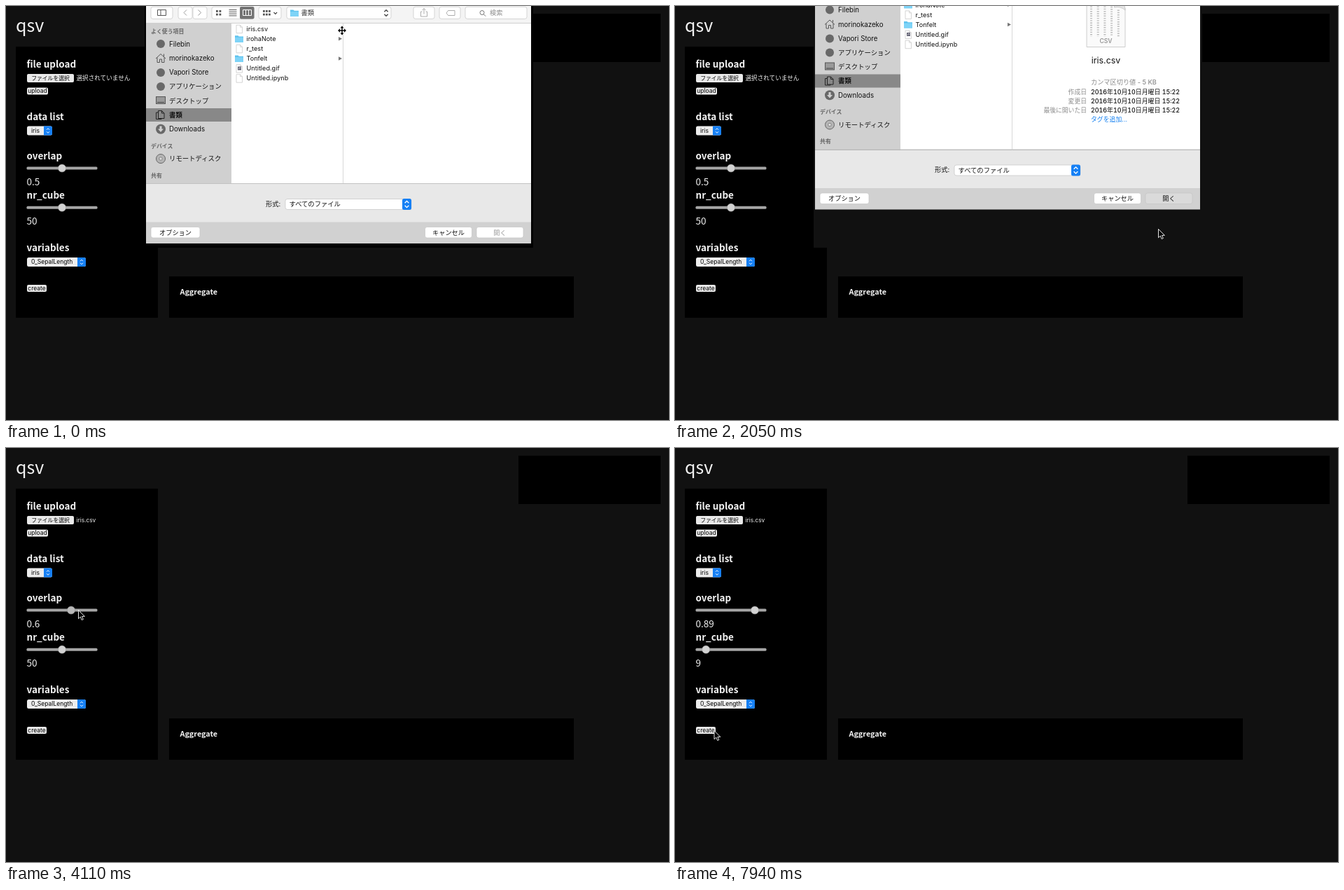
These frames come from a looping animation (947x591 px, 8000 ms). An HTML page:

```html
<!DOCTYPE html>
<html lang="ja">
<head>
<meta charset="utf-8">
<title>qsv</title>
<style>
html, body { margin: 0; width: 100%; height: 100%; overflow: hidden; background: #111; }
svg { display: block; width: 947px; height: 591px; }
text { font-family: Inter, 'Noto Sans CJK JP', 'Noto Sans CJK', sans-serif; white-space: pre; }
.page { font-family: 'Noto Sans CJK JP', 'Noto Sans CJK', sans-serif; }
.date { font-variant-numeric: tabular-nums; }
</style>
</head>
<body>
<svg id="stage" viewBox="0 0 947 591"></svg>
<script>
const LOOP = 8000, TICK = 146.9;

// Markup helpers; text is placed by its vertical centre.
const rect = (x, y, w, h, fill, extra = '') =>
  `<rect x="${x}" y="${y}" width="${w}" height="${h}" fill="${fill}" ${extra}/>`;
const text = (x, y, size, s, fill = '#111', extra = '') =>
  `<text x="${x}" y="${y + size * 0.35}" font-size="${size}" fill="${fill}" ${extra}>${s}</text>`;
const line = (d, stroke = '#555', width = 1) =>
  `<path d="${d}" fill="none" stroke="${stroke}" stroke-width="${width}"/>`;
const shape = (d, fill, extra = '') => `<path d="${d}" fill="${fill}" ${extra}/>`;
const group = (id, body) => `<g id="${id}">${body}</g>`;
const repeat = (n, draw) => Array.from({ length: n }, (_, i) => draw(i)).join('');
const bold = 'font-weight="700"';
const middle = 'text-anchor="middle"';

const heading = (y, s) => text(29.5, y, 13.5, s, '#f4f4f4', bold + ' class="page"');
const pageText = (x, y, size, s, extra = '') => text(x, y, size, s, '#f2f2f2', 'class="page" ' + extra);
const chevrons = (x, y, color, k = 1) =>
  line(`M${x - 2 * k} ${y - 1.3 * k}l${2 * k} ${-2 * k} ${2 * k} ${2 * k}M${x - 2 * k} ${y + 1.3 * k}l${2 * k} ${2 * k} ${2 * k} ${-2 * k}`, color, k);
const button = (x, y, w, h, label, size) =>
  rect(x, y, w, h, '#e9e9e9', 'rx="2"') + text(x + w / 2, y + h / 2, size, label, '#000', middle);
const select = (x, y, w, label) =>
  rect(x, y, w, 13, '#ededed', 'rx="2.5"') +
  shape(`M${x + w - 12} ${y}h9.5q2.5 0 2.5 2.5v8q0 2.5 -2.5 2.5h-9.5z`, '#1680f5') +
  chevrons(x + w - 6, y + 6.5, '#fff') + text(x + 6, y + 6.5, 8.5, label, '#000');
const slider = (name, y) => rect(29.5, y - 2, 101, 4, '#a6a6a6', 'rx="1.5"') +
  `<circle id="${name}Knob" cy="${y}" r="5.6" stroke="#8d8d8d" stroke-width=".5"/>` +
  pageText(29.5, y + 20, 13.6, '', `id="${name}Text"`);

function page() {
  return rect(0, 0, 947, 591, '#111') + rect(14, 58, 203, 387, '#000') +
    rect(732, 11, 203, 69, '#000') + rect(233, 386, 578, 59, '#000') +
    pageText(14, 28, 25, 'qsv') +
    heading(83, 'file upload') + button(30, 97, 67, 12, 'ファイルを選択', 7.8) +
    pageText(100.5, 103, 8.6, '選択されていません', 'id="noFile"') +
    text(100.5, 103, 8.3, 'iris.csv', '#f2f2f2', 'id="fileName"') +
    button(30, 116.5, 30, 10, 'upload', 8.5) +
    heading(158, 'data list') + select(30, 171.5, 36, 'iris') +
    heading(214, 'overlap') + slider('overlap', 231.5) +
    heading(270.5, 'nr_cube') + slider('cube', 287.7) +
    heading(345, 'variables') + select(30, 359, 84, '0_SepalLength') +
    button(30, 398, 28, 10, 'create', 8.5) +
    pageText(248.5, 408.5, 10.8, 'Aggregate', bold);
}

const control = (x, y, w, h, extra = '') =>
  rect(x, y, w, h, '#fff', `rx="3" stroke="#c4c4c4" stroke-width=".7" ${extra}`);
const folder = (x, y) =>
  shape(`M${x} ${y - 4.5}h4.5l1.2 1.3h6.3v8.2h-12z`, '#5fc3ee') + rect(x, y - 2, 12, 7, '#7ed3f7', 'rx=".7"');
const file = (x, y) =>
  shape(`M${x} ${y - 5.5}h5.5l3 3v8.5h-8.5z`, '#fff', 'stroke="#c3c3c3" stroke-width=".7"') +
  line(`M${x + 5.5} ${y - 5.5}v3h3`, '#c3c3c3', 0.7);
const dot = (y, r = 6) => `<circle cx="221" cy="${y}" r="${r}" fill="#686868"/>`;

function toolbar() {
  const box = (x, w) => control(x, 1.2, w, 17.2);
  const grid = (x, columns, rows, gap) => repeat(columns * rows, i =>
    rect(x + i % columns * gap, 6 + Math.floor(i / columns) * 4.7, 2.8, 2.8, '#555'));
  return rect(200, 0, 550, 25, '#f4f4f4') + line('M200 24.5h550', '#d0d0d0') +
    box(207, 31) + line('M216.5 5.5h12v8h-12zM221 5.5v8') +
    box(246, 20) + box(267, 20) + line('M258 5.5l-4 4 4 4M274.5 5.5l4 4 -4 4', '#9a9a9a') +
    box(294, 60) + grid(300, 2, 2, 4.5) +
    repeat(4, i => line(`M318.5 ${5.5 + i * 2.8}h11`)) +
    rect(334, 1, 20.5, 17.5, '#737373', 'rx="2"') + line('M338.5 5.5h12v8h-12zM342.5 5.5v8M346.5 5.5v8', '#fff') +
    box(361, 32) + grid(367, 3, 2, 4) + line('M382.5 9l2.3 2.3 2.3 -2.3', '#444', 1.2) +
    box(401, 149) + folder(406, 10) + text(421.5, 10, 9.3, '書類', '#333') + chevrons(543, 10, '#444', 1.3) +
    box(582, 30) + box(619, 30) +
    group('tools', line('M594.5 8h-2v7h9v-7h-2M597 11.5v-8M594.5 6l2.5 -2.5 2.5 2.5', '#333') +
      line('M629 10l2.5 -3.5h9.5v7h-9.5z', '#333')) +
    box(656, 88) + '<circle cx="680" cy="9.5" r="3" fill="none" stroke="#777"/>' +
    line('M682.2 11.7l3 3', '#777') + text(691, 10, 9.2, '検索', '#8c8c8c');
}

function sidebar() {
  const caption = (y, s) => text(207, y, 7.9, s, '#666', bold);
  const item = (row, s, size = 9.7, extra = '') => text(233, 54.4 + row * 20.25, size, s, '#111', extra);
  return rect(200, 25, 122, 229, '#d0d0d0') + rect(200, 146, 122, 19, '#888') +
    caption(36, 'よく使う項目') + caption(200, 'デバイス') + caption(242, '共有') +
    dot(54) + item(0, 'Filebin') +
    line('M214 75l7 -6.5 7 6.5M216 73.5v7h3.5v-4.5h3v4.5h3.5v-7M225.5 68.5v3.5') + item(1, 'morinokazeko') +
    dot(95) + item(2, 'Vapori Store') +
    dot(115) + item(3, 'アプリケーション', 9.4) +
    rect(214.5, 129.5, 13, 10, '#999', 'stroke="#555"') + line('M216 137.5h10', '#444') + item(4, 'デスクトップ', 9.4) +
    line('M217.5 149.5h5l3.5 3.5v7.5h-8.5zM222.5 149.5v3.5h3.5M217 152h-2.5v9.5h7.5v-1', '#222') + item(5, '書類', 9.4, bold) +
    dot(175.7, 7) + shape('M219.5 171.5h3v4h2.5l-4 4.5 -4 -4.5h2.5z', '#d0d0d0') + item(6, 'Downloads') +
    '<circle cx="221" cy="218" r="6.5" fill="#b5b5b5" stroke="#666"/><circle cx="221" cy="218" r="2.2" fill="#ddd" stroke="#777" stroke-width=".8"/>' +
    text(233, 218, 9.4, 'リモートディスク');
}

function fileList() {
  const names = ['iris.csv', 'irohaNote/', 'r_test', 'Tonfelt/', 'Untitled.gif', 'Untitled.ipynb'];
  const row = i => {
    const y = 32.7 + i * 14.1, name = names[i].replace('/', '');
    const icon = name === names[i] ? file(329, y)
      : folder(327, y) + shape(`M475 ${y - 2.7}l5 2.7 -5 2.7z`, '#777');
    return icon + text(343.5, y, 9.15, name, '#111', i ? '' : 'id="firstFile"');
  };
  return rect(322, 25, 428, 229, '#fff') + line('M481.5 25v229', '#d8d8d8') +
    rect(322, 26, 159, 13, '#0b64d8', 'id="highlight"') + repeat(names.length, row) +
    rect(331, 86.5, 5, 5, '#667') + line('M332 90l1.5 -2 1 1 1 -1', '#fff', 0.7);
}

function preview() {
  const column = i => `<path d="M${594.5 + i * 9.7} ${i < 3 ? 39 : 22 + i * 8}V92" stroke="#bdbdbd" stroke-width="3" stroke-dasharray="1.4 1.9"/>`;
  const dateRow = (label, i) => text(588, 171 + i * 13.2, 8.8, label, '#8b8b8b', 'text-anchor="end"') +
    text(594, 171 + i * 13.2, 8.9, '2016年10月10日月曜日 15:22', '#111', 'class="date" font-weight="500"');
  return shape('M588 35.5h39l16 16v55.5h-55z', '#fafafa', 'stroke="#c2c2c2" stroke-width=".8"') +
    repeat(5, column) +
    shape('M623 35.5q6 5 4.5 15 9 -2 15.5 4 0 -10 -7 -14 -5 -4 -13 -5z', '#e4e4e4', 'stroke="#bdbdbd" stroke-width=".7"') +
    rect(604, 93.5, 22, 10, '#fafafa') + text(615.5, 98.5, 8.6, 'CSV', '#999', middle + ' font-weight="600"') +
    text(615.5, 126, 12.4, 'iris.csv', '#111', middle) +
    text(594, 157, 9.2, 'カンマ区切り値 - 5 KB', '#8b8b8b', 'font-weight="500"') +
    ['作成日', '変更日', '最後に開いた日'].map(dateRow).join('') +
    text(594, 210.7, 8.9, 'タグを追加...', '#1580f0');
}

function dialog() {
  const push = (x, w, label, id) => control(x, 315.5, w, 15.5, `id="${id}"`) +
    text(x + w / 2, 323.5, 9.2, label, '#111', `${middle} id="${id}Label"`);
  return toolbar() + sidebar() + fileList() + group('preview', preview()) +
    rect(200, 254, 550, 55, '#e8e8e8') + line('M200 253.5h550', '#c2c2c2') +
    rect(200, 308.5, 550, 30.5, '#d1d1d1') +
    text(371, 282.7, 9.3, '形式:') + control(399, 275.5, 180, 15) +
    rect(566, 275, 13, 16, '#1680f5', 'rx="2.5"') + chevrons(572.5, 283, '#fff', 1.4) + text(404.5, 283, 9.3, 'すべてのファイル') +
    push(207, 70, 'オプション', 'options') + push(598.5, 67, 'キャンセル', 'cancel') + push(672, 67, '開く', 'open');
}

const arrow = shape('M0 0v12.2l2.8 -2.6 1.9 4.4 2.1 -.9 -1.9 -4.2h3.9z', '#000', 'stroke="#fff" stroke-width=".9"');
const resize = line('M-5 0H5M0 -5.5V5.5', '#fff', 3) + line('M-5 0H5M0 -5V5', '#000', 1.4) +
  shape('M-6 0l3 -2.7v5.4zM6 0l-3 -2.7v5.4zM0 -6.5l2.5 3h-5zM0 6.5l2.5 -3h-5z', '#000');

document.getElementById('stage').innerHTML = page() +
  rect(198, 0, 555, 345, '#000', 'id="shadow"') +
  group('residue', rect(198, 254, 2, 91, '#111') + rect(198, 333, 19, 12, '#111')) +
  group('dialog', dialog()) + group('arrow', arrow) + group('resize', resize);

const el = id => document.getElementById(id);
const show = (id, on) => el(id).setAttribute('display', on ? 'inline' : 'none');
const set = (id, name, value) => el(id).setAttribute(name, value);
const clamp = (v, low, high) => Math.min(high, Math.max(low, v));

// The pointer's turning points, timed in ticks.
const stops = [
  { at: 0, x: 480, y: 35 }, { at: 2, x: 445, y: 46 }, { at: 4, x: 412, y: 35 },
  { at: 6, x: 412, y: 35 }, { at: 12, x: 694, y: 324 }, { at: 13, x: 694, y: 324 },
  { at: 14, x: 690.5, y: 318.5 }, { at: 15, x: 450, y: 388 }, { at: 16, x: 190.5, y: 203.5 },
  { at: 21, x: 80, y: 231.5 }, { at: 24, x: 80, y: 231.5 }, { at: 27, x: 93, y: 231.5 },
  { at: 29, x: 114, y: 231.5 }, { at: 31, x: 114, y: 231.5 },
  { at: 36, x: 78.8, y: 283.5 }, { at: 38, x: 53, y: 283.5 }, { at: 44, x: 43, y: 286 },
  { at: 46, x: 43, y: 286 }, { at: 51, x: 53, y: 423 }, { at: 54, x: 56, y: 403.5 }
];

function pointer(tick) {
  const next = stops.findIndex(stop => stop.at > tick);
  if (next < 0) return stops[stops.length - 1];
  const a = stops[next - 1], b = stops[next], u = (tick - a.at) / (b.at - a.at);
  return { x: a.x + (b.x - a.x) * u, y: a.y + (b.y - a.y) * u };
}

// A knob trails the pointer by one tick, its number by two.
function drag(name, tick, from, to, grip, unit) {
  const knob = lag => pointer(clamp(tick - lag, from, to)).x + grip;
  const held = tick >= from && tick <= to;
  set(name + 'Knob', 'cx', knob(1));
  set(name + 'Knob', 'fill', held ? '#b8b8b8' : '#d2d2d2');
  el(name + 'Text').textContent = Math.round((knob(2) - 36.6) / 0.87) / unit;
}

function draw(t) {
  const tick = Math.floor((t + 12) / TICK);
  const chosen = tick >= 5, previewed = tick >= 7, pressed = tick >= 13;
  const closing = tick >= 14, closed = tick >= 15, named = tick >= 17;

  show('dialog', !closed);
  set('dialog', 'transform', `translate(0 ${closing ? -48.5 : 0})`);
  show('shadow', !closed);
  set('shadow', 'fill', closing ? '#111' : '#000');
  show('residue', closed && tick < 18);
  show('highlight', chosen);
  set('firstFile', 'fill', chosen ? '#fff' : '#111');
  show('preview', previewed);
  set('tools', 'opacity', previewed ? 1 : 0.4);
  set('open', 'fill', pressed ? '#dadada' : '#fff');
  set('openLabel', 'fill', previewed ? '#111' : '#999');

  show('noFile', !named);
  show('fileName', named);
  drag('overlap', tick, 24, 30, 0, 100);
  drag('cube', tick, 36, 45, 1.2, 1);

  const { x, y } = pointer(tick);
  for (const id of ['arrow', 'resize']) set(id, 'transform', `translate(${x} ${y})`);
  show('resize', tick < 1);
  show('arrow', tick >= 1);
}

const start = performance.now();
function play() {
  draw((performance.now() - start) % LOOP);
  requestAnimationFrame(play);
}
play();
</script>
</body>
</html>
```
